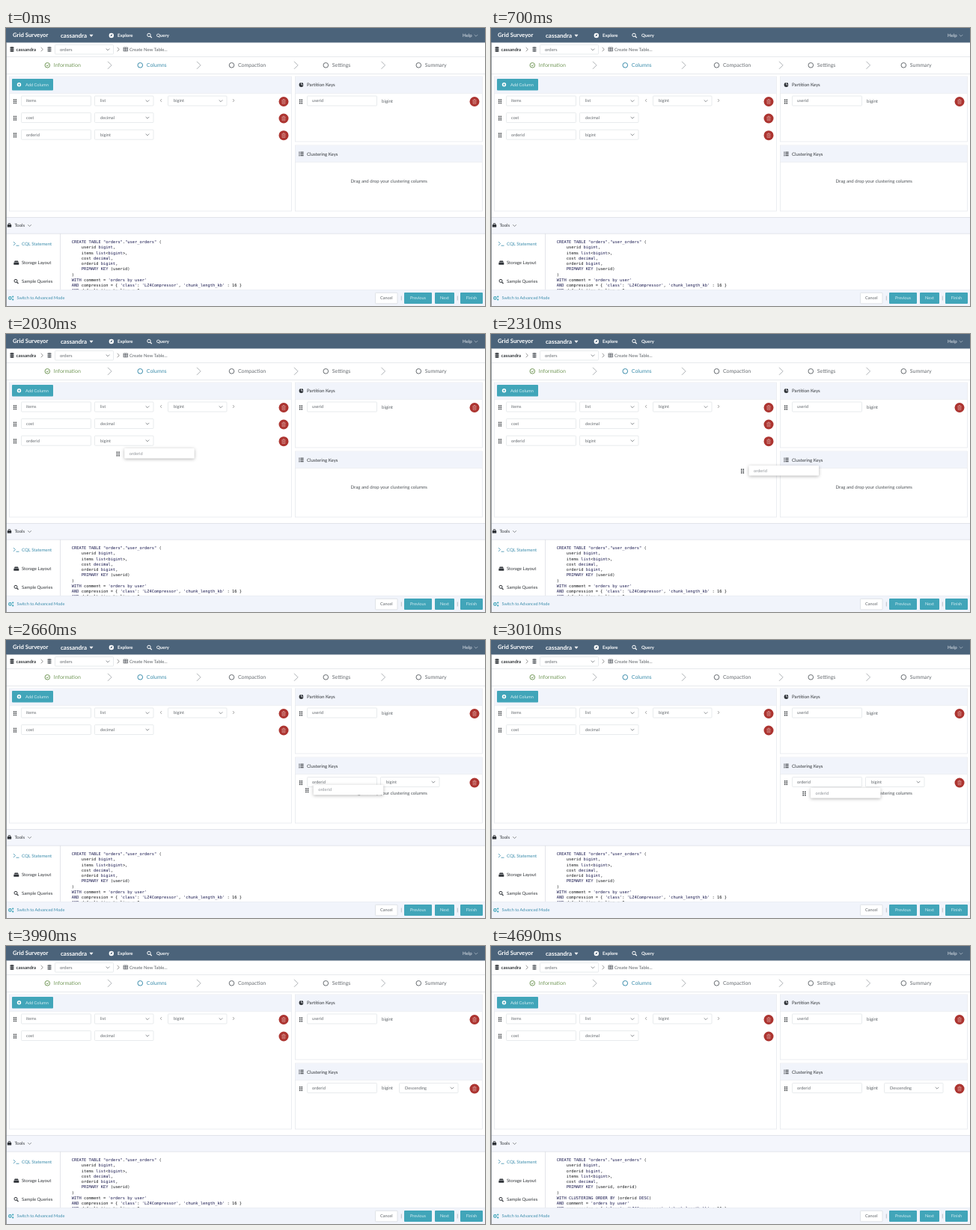
An HTML page for the animation above (5040 ms loop, 640x372 px).

```html
<!DOCTYPE html>
<html lang="en">
<head>
<meta charset="utf-8">
<title>Create table</title>
<style>
  html, body { margin: 0; width: 100%; height: 100%; overflow: hidden; background: #fff; }
  svg { display: block; width: 640px; height: 372px; }
  text { font-family: Lato, "Open Sans", sans-serif; text-rendering: geometricPrecision; white-space: pre; }
  .code text { font: 5.4px "DejaVu Sans Mono", monospace; }
</style>
</head>
<body>
<svg id="stage" viewBox="0 0 640 372" xmlns="http://www.w3.org/2000/svg"></svg>
<script>
const LOOP = 5040, TICK = 70;
const PICK = 1820, ENTER = 2450, DROP = 3220, REFRESH = 4270;
const TEAL = '#41a5b9', BLUE = '#3c8dac', INK = '#454a50', GREY = '#63686d', RULE = '#dfe2e6', PALE = '#f1f4fb';

const rect = (x, y, w, h, fill, stroke = 'none', r = 0) =>
  `<rect x="${x}" y="${y}" width="${w}" height="${h}" rx="${r}" fill="${fill}" stroke="${stroke}" stroke-width=".7"/>`;
const path = (d, stroke, width = .8, fill = 'none') =>
  `<path d="${d}" fill="${fill}" stroke="${stroke}" stroke-width="${width}"/>`;
const disc = (x, y, r, fill, stroke = 'none') =>
  `<circle cx="${x}" cy="${y}" r="${r}" fill="${fill}" stroke="${stroke}"/>`;
// y is the vertical middle of the line
const label = (x, y, str, fill = INK, size = 6.1, weight = 400, anchor = 'start') =>
  `<text x="${x}" y="${y + size * .34}" fill="${fill}" font-size="${size}" font-weight="${weight}" text-anchor="${anchor}">${str}</text>`;
const group = (id, body) => `<g id="${id}">${body}</g>`;

const right = (x, y, s, color, width) => path(`M${x - s / 2} ${y - s}l${s} ${s}l${-s} ${s}`, color, width);
const down = (x, y, color = '#70757a') => path(`M${x - 2.3} ${y - 1.1}l2.3 2.3l2.3 -2.3`, color, .8);

const field = (x, y, str) =>
  rect(x + .5, y - 6.5, 93, 13, '#fff', RULE, 1) + label(x + 7, y, str, GREY, 5.65);
const select = (x, y, str) =>
  rect(x + .5, y - 6.5, 78.5, 13, '#fff', RULE, 1) + label(x + 8, y, str, GREY, 5.65) + down(x + 71, y);

function handle(x, y) {
  let out = '';
  for (const dx of [-1.3, 1.3]) for (const dy of [-2.3, 0, 2.3])
    out += rect(x + dx - .75, y + dy - .75, 1.5, 1.5, '#33373b');
  return out;
}
const trash = (x, y) => disc(x, y, 6.5, '#ac3430') +
  path(`M${x - 2.6} ${y - 1.7}h5.2M${x - 1} ${y - 1.9}v-1h2v1M${x - 1.9} ${y - 1.5}v4.3h3.8v-4.3M${x - .7} ${y - .5}v2.3M${x + .7} ${y - .5}v2.3`, '#dfaaa7', .6);
const columnRow = (y, name, type) =>
  handle(12, y + .7) + field(20, y, name) + select(118, y, type) + trash(371, y + 1);

const panel = (x, y, w, h, head) =>
  rect(x + .5, y + .5, w, h, '#fff', '#e3e6eb') + rect(x + .8, y + .8, w - .6, head, PALE) +
  path(`M${x} ${y + head + 1}h${w}`, '#e6e9ef', .6);
const database = (x, y, color) => [-2.2, 0, 2.2].map(d =>
  `<ellipse cx="${x}" cy="${y + d}" rx="2.8" ry="1.3" fill="${color}" stroke="#fff" stroke-width=".3"/>`).join('');
const button = (x, w, str) =>
  rect(x, 354, w, 15, TEAL, 'none', 1) + label(x + w / 2, 361.5, str, '#d5edf2', 5.6, 400, 'middle');

function header() {
  return rect(0, 0, 640, 19.5, '#4b637a') +
    label(9, 9.7, 'Grid Surveyor', '#fff', 7.75, 700) +
    label(73, 9.9, 'cassandra', '#fff', 8, 700) + path('M111.5 8.8h5l-2.5 3.2z', 'none', 0, '#fff') +
    disc(140.8, 10, 3.2, '#fff') + path('M139.3 11.6l.9 -2.3l2.2 -1l-.9 2.3z', 'none', 0, '#4b637a') +
    label(149, 9.8, 'Explore', '#fff', 6.1, 700) +
    `<circle cx="191" cy="9.4" r="2.2" fill="none" stroke="#fff" stroke-width="1"/>` + path('M192.6 11l2.2 2.2', '#fff', 1.2) +
    label(201, 9.8, 'Query', '#fff', 6, 700) +
    label(610, 9.8, 'Help', '#e8edf2', 6.1) + down(628, 10, '#a9b6c3');
}

function breadcrumb() {
  return database(8, 28.5, '#2f3338') + label(13.5, 28.6, 'cassandra', '#33373b', 6.1, 700) +
    right(48, 28.6, 2.6, '#777', .8) + database(58, 28.5, '#666b70') +
    rect(65.5, 22.5, 78, 12.5, '#fff', RULE, 1) + label(72, 28.7, 'orders', GREY, 5.9) + down(136, 28.7) +
    right(150, 28.6, 2.6, '#777', .8) +
    path('M157 26h5.6v5h-5.6zM157 27.6h5.6M157 29.3h5.6M159.8 26v5', '#555a60', .7) +
    label(165, 28.6, 'Create New Table...', '#5d6267', 6) +
    path('M0 38.5h640', '#e1e4e8', .8);
}

function wizard() {
  // circle, name, colour, chevron that follows
  const steps = [[55, 'Information', '#74995a', 138.5], [179, 'Columns', BLUE, 257.5],
    [301.2, 'Compaction', '#666b70', 387.5], [427, 'Settings', '#666b70', 504], [551, 'Summary', '#666b70']];
  return steps.map(([x, name, color, chevron]) =>
    disc(x + .3, 49.8, 3.3, '#fff', color) + label(x + 8.8, 50, name, color, 7) +
    (chevron ? right(chevron, 49.8, 5, '#999da2', .8) : '')).join('') +
    path('M53.8 49.8l1.2 1.3l2.1 -2.4', '#74995a', .9) + path('M0 61.5h640', '#e1e4e8', .8);
}

function editor() {
  const pie = disc(394.5, 76, 2.9, '#2f3338') + path('M394.5 76v-3.4M394.5 76h3.4', PALE, .7);
  const list = [-2.2, 0, 2.2].map(d => rect(391.3, 167.9 + d, 1.2, 1.2, '#2f3338') + rect(393.4, 167.9 + d, 4.2, 1.1, '#2f3338')).join('');
  return panel(4, 64.5, 377, 180, 22) +
    rect(8, 68, 55, 15.5, TEAL, 'none', 1) + disc(17.5, 75.8, 2.7, '#fff') +
    path('M16 75.8h3M17.5 74.3v3', TEAL, .8) + label(26, 75.9, 'Add Column', '#d5edf2', 5.7) +
    columnRow(97.5, 'items', 'list') + right(304, 97, 2, '#888', .7) +
    path('M208.2 95l-2 2l2 2', '#888', .7) + select(216, 97.5, 'bigint') +
    columnRow(120, 'cost', 'decimal') +
    group('sourceRow', columnRow(142.7, 'orderid', 'bigint')) +
    panel(386, 64.5, 250, 87, 22) + pie + label(402, 76, 'Partition Keys', '#33373b', 6.15) +
    handle(394, 98.5) + field(402, 97.5, 'userid') + label(502, 97.5, 'bigint', GREY, 6.1) + trash(626, 98.5) +
    panel(386, 156.5, 250, 88, 22) + list + label(402, 168.5, 'Clustering Keys', '#33373b', 6.1) +
    group('hint', label(460.5, 205.2, 'Drag and drop your clustering columns', '#4f5459', 6.07)) +
    group('keyRow', handle(394, 191) + field(402, 190, 'orderid') + trash(626, 191)) +
    group('keyHover', select(500, 190, 'bigint')) +
    group('keyDone', label(502, 190, 'bigint', GREY, 6.1) + select(525, 190, 'Descending'));
}

const KEYWORD = /\b(CREATE|TABLE|PRIMARY|KEY|WITH|CLUSTERING|ORDER|BY|AND|DESC|bigint|list|decimal)\b|'[^']*'|"[^"]*"/g;
const escapeHtml = s => s.replace(/</g, '&lt;').replace(/>/g, '&gt;');
function statement(id, source) {
  const lines = source.split('\n').map((line, i) => {
    let out = '', last = 0;
    for (const m of line.matchAll(KEYWORD)) {
      out += escapeHtml(line.slice(last, m.index)) + `<tspan fill="#16164c">${m[0]}</tspan>`;
      last = m.index + m[0].length;
    }
    return `<text x="87.7" y="${288 + i * 7.25}" fill="#15171a">${out + escapeHtml(line.slice(last))}</text>`;
  });
  return `<g id="${id}" class="code">${lines.join('')}</g>`;
}
const compression = "AND compression = { 'class': 'LZ4Compressor', 'chunk_length_kb' : 16 }";
const sqlBefore = `CREATE TABLE "orders"."user_orders" (
    userid bigint,
    items list<bigint>,
    cost decimal,
    orderid bigint,
    PRIMARY KEY (userid)
)
WITH comment = 'orders by user'
${compression}
AND default_time_to_live = 0`;
const sqlAfter = `CREATE TABLE "orders"."user_orders" (
    userid bigint,
    orderid bigint,
    items list<bigint>,
    cost decimal,
    PRIMARY KEY (userid, orderid)
)
WITH CLUSTERING ORDER BY (orderid DESC)
AND comment = 'orders by user'
${compression}`;

function tools() {
  return rect(0, 253, 640, 22, '#f4f6fc') + path('M0 253.5h640M0 275.2h640', '#dcdfe6', .8) +
    rect(1.8, 263, 5.4, 3.6, '#2f3338', 'none', .5) + path('M3.3 263v-1.5h2.4v1.5', '#2f3338', .8) +
    label(11.6, 264.3, 'Tools', '#33373b', 5.9) + down(31.5, 264.3) +
    path('M72.5 275v75', '#dcdfe6', .8) +
    path('M10 286l2.5 2.5l-2.5 2.5M13.5 291.2h4', BLUE, .8) + label(21, 288.8, 'CQL Statement', BLUE, 6) +
    rect(10.3, 314, 7, 2.8, '#2f3338', 'none', .6) + path('M11.8 311.5h4l1.2 2h-6.4z', 'none', 0, '#2f3338') +
    label(21, 314, 'Storage Layout', '#33373b', 6) +
    `<circle cx="13" cy="338.4" r="2" fill="none" stroke="#2f3338"/>` + path('M14.5 340l2 2', '#2f3338', 1.1) +
    label(21, 339, 'Sample Queries', '#33373b', 6) +
    statement('before', sqlBefore) + statement('after', sqlAfter);
}

function footer() {
  return rect(0, 350.3, 640, 22, PALE) + path('M0 350.5h640', '#e1e4ea', .5) +
    `<circle cx="5.4" cy="361.4" r="1.7" fill="none" stroke="${TEAL}" stroke-width="1.2"/>` +
    disc(9.2, 359.6, 1.1, TEAL) + disc(9.2, 363.4, 1.1, TEAL) +
    label(14.5, 361.5, 'Switch to Advanced Mode', BLUE, 5.55) +
    rect(493.5, 354.3, 29.5, 14.5, '#fff', '#d5d9df', 1) + label(508.3, 361.5, 'Cancel', '#5d6267', 5.6, 400, 'middle') +
    path('M528.3 358.5v6M603.3 358.5v6', '#a9adb3', .7) +
    button(532, 37, 'Previous') + button(573, 26, 'Next') + button(607, 30, 'Finish');
}

const dragged = handle(12, 143.5) +
  `<g style="filter:drop-shadow(0 1px 2px rgba(0,0,0,.3))">${rect(20.5, 136, 93.5, 13.5, '#fff', 'none', 1)}</g>` +
  label(27, 142.7, 'orderid', '#8f9398', 5.65);

const stage = document.getElementById('stage');
stage.innerHTML = rect(0, 0, 640, 372, '#fff') + header() + breadcrumb() + wizard() + editor() + tools() + footer() +
  rect(0, 19, .8, 353, '#7d8287') + group('ghost', dragged);

const part = id => document.getElementById(id);
const show = (id, on) => { part(id).style.display = on ? '' : 'none'; };

// Quick sweep towards the right pane, then a slow settle into the list
function dragOffset(t) {
  if (t <= 2310) {
    const p = (t - 1750) / 560, k = p * p * (2.4 - 1.4 * p);
    return [324 * k, 40 * k];
  }
  const q = 1 - Math.min(1, (t - 2310) / 630), k = 1 - q * q;
  return [324 + 82.5 * k, 40 + 22 * k];
}

function render(now) {
  const t = Math.floor((now % LOOP) / TICK) * TICK;
  show('sourceRow', t < ENTER);
  show('hint', t < DROP);
  show('keyRow', t >= ENTER);
  show('keyHover', t >= ENTER && t < DROP);
  show('keyDone', t >= DROP);
  show('before', t < REFRESH);
  show('after', t >= REFRESH);
  const dragging = t >= PICK && t < DROP;
  show('ghost', dragging);
  if (dragging) part('ghost').setAttribute('transform', `translate(${dragOffset(t)})`);
}

const start = performance.now();
function loop() {
  render(performance.now() - start);
  requestAnimationFrame(loop);
}
loop();
</script>
</body>
</html>
```
